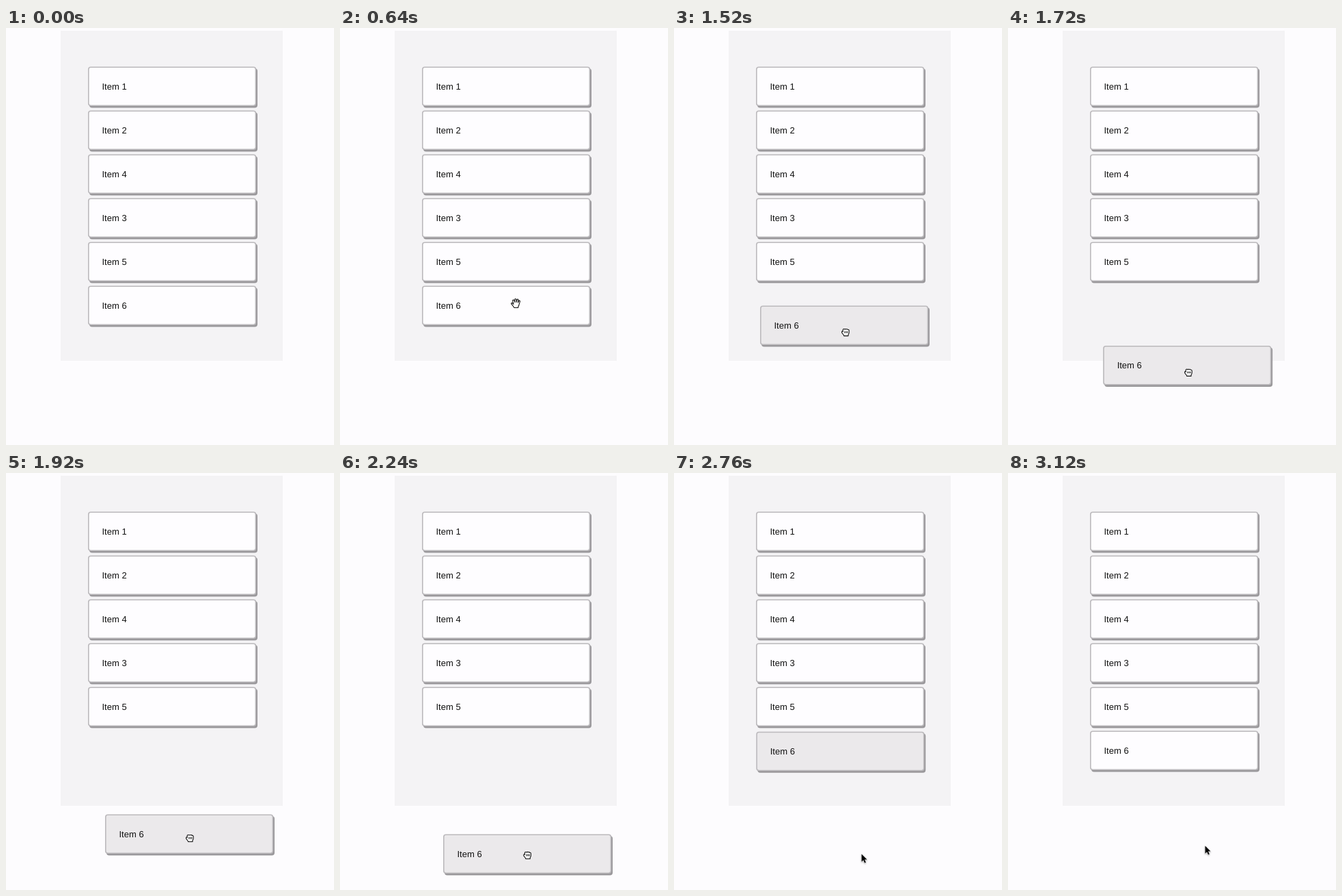
Recreate the animation shown at these times as an HTML page. Size 480x609 px, loop 4.16 s.

```html
<!DOCTYPE html>
<html lang="en">
<head>
<meta charset="utf-8">
<title>Sortable list</title>
<style>
  html, body { margin: 0; width: 100%; height: 100%; overflow: hidden; background: #fdfcfe; }
  svg { display: block; }
  text { font: 13px "Liberation Sans", Arial, sans-serif; fill: #111; text-rendering: geometricPrecision; }
  .shadow { fill: #9a989b; }
  .card { fill: #fefdff; stroke: #bbb9bc; stroke-width: 1.6; }
  .held .card { fill: #ebe9eb; }
  .hand { fill: #fff; stroke: #111; stroke-width: 1.1; stroke-linejoin: round; stroke-linecap: round; }
  .arrow { fill: #000; stroke: #fff; stroke-width: 1; paint-order: stroke; filter: drop-shadow(0 1px 1px #0005); }
</style>
</head>
<body>
<svg width="480" height="609" viewBox="0 0 480 609">
  <rect x="80" y="4" width="325" height="482" fill="#f4f3f5"/>
  <g id="list"></g>
  <g id="cursor">
    <path id="arrow" class="arrow" d="M0 0V11.2L2.6 8.8 4.5 13 6.3 12.2 4.5 8.1H8Z"/>
    <path id="open" class="hand" d="M-3.4 1.4-4.6-3.2Q-4.8-4.8-3.6-4.9-2.6-4.9-2.2-3.6L-1.4-1.4-1.7-5Q-1.7-6.4-.6-6.4.5-6.4.6-5L.9-1.6 1.5-4.9Q1.9-6.1 2.8-5.9 3.8-5.7 3.6-4.3L3.2-1 4.2-3.2Q4.9-4.2 5.6-3.7 6.3-3.2 5.9-2L4.7 2Q4.4 4 3.4 5V6.5H-2.6Q-3 5-4.4 3.6L-6.6.9Q-7-.2-6-.5-5.2-.6-4.4.4Z"/>
    <path id="closed" class="hand" d="M-3.6-3.7q1.4-1.7 2.9-.4q1.1-1.1 2.3-.1q1.2-.7 2.1.5q1.6-.2 1.7 1.5v2.6q0 2-1.2 3v2h-6.4q0-1.1-1.3-2.4q-1.8-1.7-1.8-3.2q0-1.3 1.7-1.4zM-3.6-3.7v3M-1-1v1.8M1.1-1v1.8M3.1-1v1.8"/>
  </g>
</svg>
<script>
const LOOP = 4160, STEP = 40, LAG = 35;
const GRAB = 1240, LIFT = 1360, DROP = 2560, DROP_TIME = 353;
const $ = id => document.getElementById(id);

// Pointer path: time, x, y
const path = [
  [40, 368, 540], [160, 314, 447], [320, 264, 389], [440, 260, 401],
  [600, 260, 401], [760, 243, 407], [1300, 243, 407], [1485, 249, 436],
  [1725, 264, 504], [1885, 268, 529], [2205, 274, 558], [2560, 274, 558.5],
  [2600, 274.5, 556.5], [2760, 274.5, 556.5], [3120, 288.5, 544.5]
];

const slope = (i, axis) => path[i + 1]
  ? path[i] && (path[i + 1][axis] - path[i][axis]) / (path[i + 1][0] - path[i][0]) : 0;

// Harmonic mean keeps the curve from overshooting its points
function tangent(i, axis) {
  if (i === 0) return slope(0, axis);
  const a = slope(i - 1, axis), b = slope(i, axis);
  return a * b > 0 ? 2 * a * b / (a + b) : 0;
}

function pointer(t) {
  const last = path[path.length - 1];
  if (t >= last[0]) return last.slice(1);
  const i = Math.max(0, path.findIndex(p => p[0] > t) - 1);
  const span = path[i + 1][0] - path[i][0];
  const u = Math.max(0, (t - path[i][0]) / span), v = 1 - u;
  return [1, 2].map(axis =>
    path[i][axis] * v * v * (1 + 2 * u) + path[i + 1][axis] * u * u * (3 - 2 * u) +
    span * u * v * (tangent(i, axis) * v - tangent(i + 1, axis) * u));
}

// cubic-bezier(.2, 1, .1, 1)
function dropEase(x) {
  let lo = 0, hi = 1;
  for (let i = 0; i < 24; i++) {
    const s = (lo + hi) / 2, r = 1 - s;
    if (.6 * r * r * s + .3 * r * s * s + s ** 3 < x) lo = s; else hi = s;
  }
  return 1 - (1 - lo) ** 3;
}

function cardOffset(t) {
  if (t < LIFT || t >= DROP + DROP_TIME) return [0, 0];
  const [x, y] = pointer(Math.min(t, DROP) - LAG);
  const left = t > DROP ? 1 - dropEase((t - DROP) / DROP_TIME) : 1;
  return [(x - 243) * left, (y - 407) * left];
}

$("list").innerHTML = [1, 2, 4, 3, 5, 6].map((n, i) => `
  <g transform="translate(120 ${56.5 + 64 * i})"><g id="item${n}">
    <rect class="shadow" x="2" y="2.5" width="246" height="57.5" rx="4"/>
    <rect class="card" x=".8" y=".8" width="244.6" height="55.9" rx="3.2"/>
    <text x="20.5" y="33">Item ${n}</text>
  </g></g>`).join("");

const show = (id, on) => $(id).style.display = on ? "" : "none";
const place = (id, [x, y]) => $(id).setAttribute("transform", `translate(${x} ${y})`);

function draw(t) {
  const [x, y] = pointer(t);
  const held = t >= GRAB && t <= DROP;
  const over = t < GRAB && x < 366 && y > 377 && y < 434;
  place("cursor", [x, y]);
  show("cursor", t >= path[0][0]);
  show("closed", held);
  show("open", over);
  show("arrow", !held && !over);
  place("item6", cardOffset(t));
  $("item6").classList.toggle("held", t >= LIFT && t < DROP + DROP_TIME);
}

let start;
function tick(now) {
  start ??= now;
  draw(Math.floor((now - start) % LOOP / STEP) * STEP);
  requestAnimationFrame(tick);
}
draw(0);
requestAnimationFrame(tick);
</script>
</body>
</html>
```
